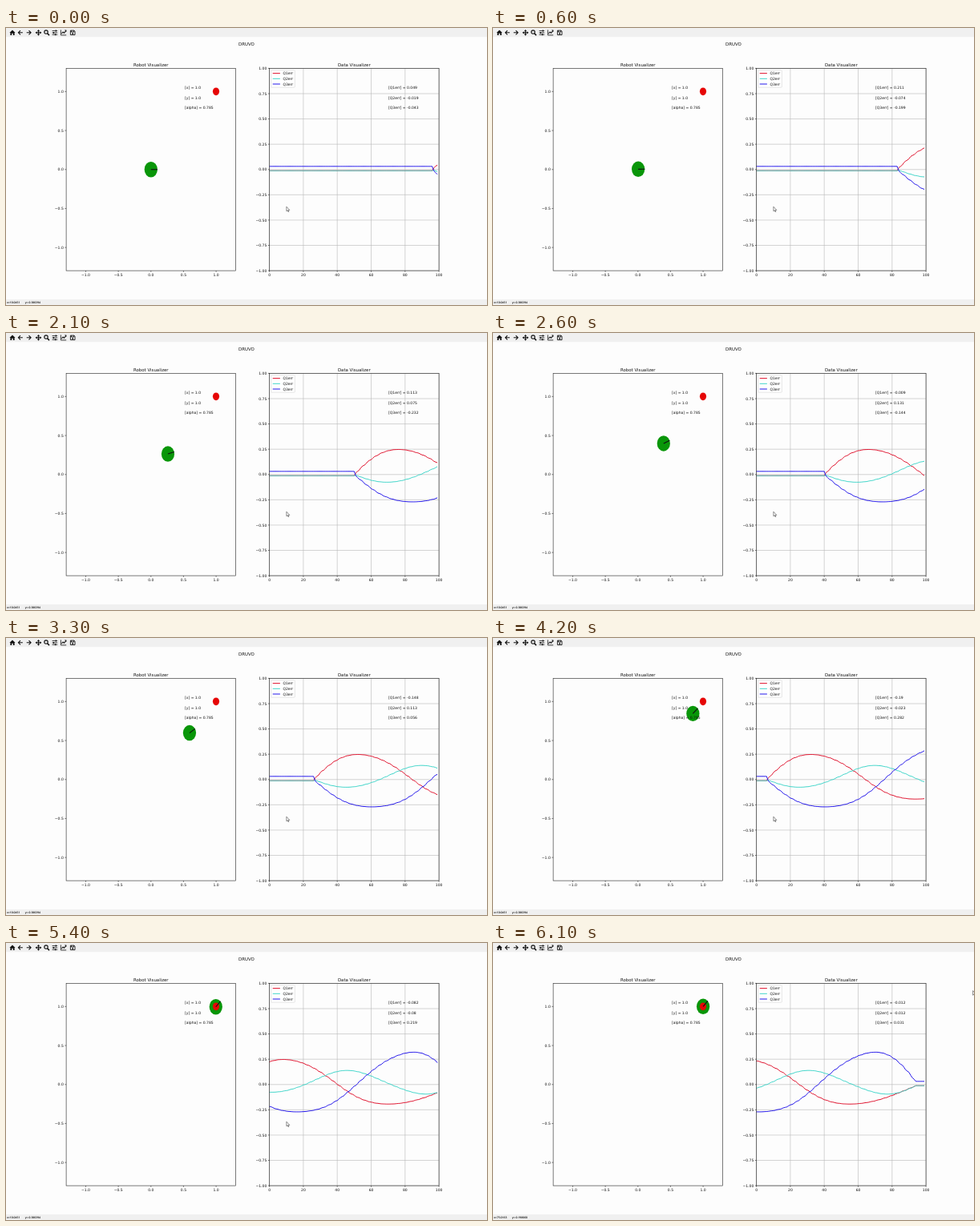
These frames come from a looping animation (600x346 px, 6.2 s). An HTML page:

```html
<!DOCTYPE html>
<html lang="en">
<head>
<meta charset="utf-8">
<title>Robot and data visualizer</title>
<style>
html, body { margin: 0; width: 100%; height: 100%; overflow: hidden; background: #fdfdfd; }
svg { display: block; width: 600px; height: 346px; }
text { font-family: "DejaVu Sans", sans-serif; font-size: 4.53px; fill: #111; white-space: pre; text-rendering: geometricPrecision; }
.title { font-size: 5.43px; text-anchor: middle; }
.mid { text-anchor: middle; }
.end { text-anchor: end; }
.status text { font-family: "Open Sans", sans-serif; font-size: 3.4px; font-weight: 600; fill: #000; }
.bar { fill: #f0f0f0; }
.grid { stroke: #b8b8b8; stroke-width: .6; }
.axis { stroke: #222; stroke-width: .6; fill: none; }
.curve { fill: none; stroke-width: 1; stroke-linejoin: round; }
.icons { fill: none; stroke: #111; stroke-width: 1.1; }
.icons .solid { fill: #111; stroke: none; }
</style>
</head>
<body>
<svg id="stage" viewBox="0 0 600 346">
  <rect class="bar" width="600" height="11.3"/>
  <rect class="bar" y="339" width="600" height="7"/>
  <g class="icons">
    <path class="solid" d="M4.4 5.9 8 2.5 11.6 5.9H10.6V9H8.8V6.8H7.2V9H5.4V5.9Z"/>
    <path d="M20.8 5.8H15.5M18 3.2 15.4 5.8 18 8.4M25.7 5.8H31M28.5 3.2 31.1 5.8 28.5 8.4"/>
    <path d="M37.5 5.8H43.5M40.5 2.8V8.8"/>
    <path class="solid" d="M40.5 1.9 42.1 4H38.9ZM40.5 9.7 42.1 7.6H38.9ZM36.6 5.8 38.7 4.2V7.4ZM44.4 5.8 42.3 4.2V7.4Z"/>
    <circle cx="50" cy="5.1" r="2.2"/>
    <path d="M51.6 6.7 54 9.1" stroke-width="1.5"/>
    <path d="M57.6 3.5H64.2M57.6 5.9H64.2M57.6 8.3H64.2" stroke-width=".8"/>
    <path d="M62.3 2.5V4.5M59.4 4.9V6.9M61.6 7.3V9.3" stroke-width="1.3"/>
    <path d="M68.4 2.4V8.9H75.2" stroke-width=".8"/>
    <path d="M69.4 7 71.1 5 72.5 6.3 74.8 3.3"/>
    <path class="solid" d="M73 2.6H75.4V5Z"/>
    <path d="M80.4 3.1H85L86 4.1V8.6H80.4ZM81.6 3.2V5H84.6V3.2" stroke-width=".9"/>
    <circle class="solid" cx="83.2" cy="7" r=".9"/>
  </g>
  <text class="title" x="300" y="21.8">DRUVO</text>
  <text class="title" x="180.8" y="47.8">Robot Visualizer</text>
  <text class="title" x="434.3" y="47.8">Data Visualizer</text>
  <g id="grid" class="grid"></g>
  <g id="robot">
    <ellipse id="body" rx="8.13" ry="9.73" fill="#099609"/>
    <ellipse cx="262" cy="79.3" rx="4.07" ry="4.87" fill="#e60505"/>
    <path id="heading" stroke="#111" stroke-width="1.1"/>
  </g>
  <g id="curves"></g>
  <g id="axes" class="axis">
    <rect x="75.1" y="50.4" width="211.4" height="252.7"/>
    <rect x="328.6" y="50.4" width="211.5" height="252.7"/>
  </g>
  <g id="legend">
    <rect x="330.7" y="52.6" width="29.6" height="21.6" rx="1" fill="#fff" fill-opacity=".8" stroke="#ccc" stroke-width=".5"/>
  </g>
  <g id="labels"></g>
  <g class="status">
    <text id="statX" x="1" y="344"></text>
    <text id="statY" x="23.7" y="344"></text>
  </g>
  <path id="cursor" d="M0 0V5.6L1.3 4.5 2.2 6.5 3 6.1 2.2 4.2H3.9Z" fill="#fff" stroke="#333" stroke-width=".55"/>
</svg>
<script>
const LOOP = 6200, TICK = 100, SAMPLES = 100, RUN = 127;
const $ = id => document.getElementById(id);
const clamp = v => Math.min(1, Math.max(0, v));

function add(parent, tag, attrs, text) {
  const el = document.createElementNS("http://www.w3.org/2000/svg", tag);
  for (const k in attrs) el.setAttribute(k, attrs[k]);
  if (text !== undefined) el.textContent = text;
  return $(parent).appendChild(el);
}

const robotX = v => 180.8 + 81.3 * v;
const robotY = v => 176.75 - 97.4 * v;
const dataX = i => 328.6 + 2.115 * i;
const dataY = v => 176.75 - 126.35 * v;
const rowY = i => 76 + 12.55 * i;

// Each error curve is a short sine series over the run, resting outside it
const series = [
  { name: "Q1err", color: "#e0142f", rest: -.012, amps: [-.002, .215, .053, .004, .002, .006, .003] },
  { name: "Q2err", color: "#40d6ca", rest: -.012, amps: [.044, -.003, -.099, .006, -.002, .003, -.004] },
  { name: "Q3err", color: "#2316ea", rest: .031, amps: [-.049, -.286, .05, -.021, .001, -.011, .003] }
];

function value(s, u) {
  if (u <= 0 || u >= RUN) return s.rest;
  const x = u / RUN;
  return s.amps.reduce((sum, a, k) => sum + a * Math.sin((k + 1) * Math.PI * x), s.rest * x);
}

// Slight roughness where the curve is steep
function rough(s, u) {
  if (u < 2 || u > RUN - 2) return value(s, u);
  const steep = Math.abs(value(s, u + 1) - value(s, u - 1));
  return value(s, u) + .17 * steep * Math.sin(u * 1.7);
}

// Newest sample per tick: two a tick, with two quicker stretches and two stalls
const pace = [[0, 3], [13, 33], [33, 73], [42, 93], [61, 132]];
const stalls = [7, 27];

function newestAt(tick) {
  const k = stalls.includes(tick) ? tick - 1 : tick;
  const i = Math.max(1, pace.findIndex(p => p[0] >= k));
  const [a, b] = pace[i - 1], [c, d] = pace[i];
  return Math.floor(b + (d - b) * (k - a) / (c - a));
}

const num = (v, digits) => v.toFixed(digits).replace("-", "\u2212");

function ticks(from, to, step, mark) {
  for (let v = from; v <= to; v += step) mark(v);
}
function tickX(x, label) {
  add("axes", "path", { d: `M${x} 303.1v1.7` });
  add("labels", "text", { class: "mid", x, y: 310.1 }, label);
}
function tickY(left, y, label) {
  add("axes", "path", { d: `M${left} ${y}h-1.7` });
  add("labels", "text", { class: "end", x: left - 3.3, y: y + 1.7 }, label);
}

ticks(-1, 1, .5, v => {
  tickX(robotX(v), num(v, 1));
  tickY(75.1, robotY(v), num(v, 1));
});
ticks(0, 100, 20, v => {
  tickX(dataX(v), num(v, 0));
  add("grid", "path", { d: `M${dataX(v)} 50.4V303.1` });
});
ticks(-1, 1, .25, v => {
  tickY(328.6, dataY(v), num(v, 2));
  add("grid", "path", { d: `M328.6 ${dataY(v)}H540.1` });
});

["[x] = 1.0", "[y] = 1.0", "[alpha] = 0.785"].forEach((label, i) =>
  add("labels", "text", { x: 223, y: rowY(i) }, label));

series.forEach((s, i) => {
  const y = 56.6 + 6.7 * i;
  s.line = add("curves", "path", { class: "curve", stroke: s.color });
  add("legend", "path", { class: "curve", stroke: s.color, d: `M332.7 ${y}h9.2` });
  add("legend", "text", { x: 345.4, y: y + 1.7 }, s.name);
  s.label = add("labels", "text", { x: 477, y: rowY(i) });
});

function drawCurves(newest) {
  for (const s of series) {
    let d = "";
    for (let i = 0; i < SAMPLES; i++) {
      const v = rough(s, newest - SAMPLES + 1 + i);
      d += (i ? "L" : "M") + dataX(i).toFixed(2) + " " + dataY(v).toFixed(2);
    }
    s.line.setAttribute("d", d);
    s.label.textContent = `[${s.name}] = ${+value(s, newest).toFixed(3)}`;
  }
}

// The robot eases to the goal and turns a little ahead of its travel
function drawRobot(newest) {
  const p = Math.sin(Math.PI / 2 * clamp((newest - 11.5) / 110)) ** 2;
  const angle = Math.PI / 4 * (1 - (1 - p) ** 1.4);
  const x = robotX(p), y = robotY(p + .005 * Math.sin(Math.PI * p));
  $("body").setAttribute("cx", x);
  $("body").setAttribute("cy", y);
  $("heading").setAttribute("d", `M${x} ${y}l${8.13 * Math.cos(angle)} ${-9.73 * Math.sin(angle)}`);
}

// The pointer sweeps off to the upper right at the end
function drawPointer(tick) {
  const e = clamp((tick - 58) / 3);
  $("cursor").setAttribute("transform", `translate(${349.9 + 248.7 * e} ${223.2 - 163.6 * e ** 3})`);
  $("statX").textContent = e ? "x=75.0163" : "x=10.0451";
  $("statY").textContent = e ? "y=-0.198060" : "y=-0.380394";
}

let shown = -1;
const start = performance.now();
function frame() {
  const tick = Math.floor((performance.now() - start) % LOOP / TICK);
  if (tick !== shown) {
    const newest = newestAt(tick);
    drawCurves(newest);
    drawRobot(newest);
    drawPointer(tick);
    shown = tick;
  }
  requestAnimationFrame(frame);
}
frame();
</script>
</body>
</html>
```
